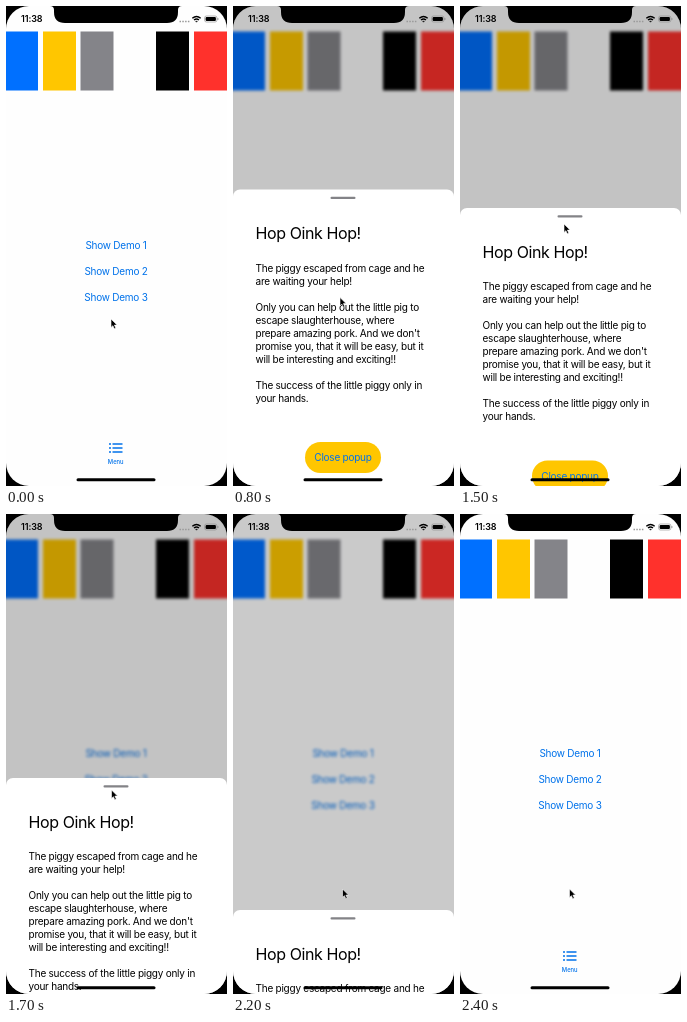
These frames come from a looping animation (221x480 px, 2.5 s). An HTML page:

```html
<!DOCTYPE html>
<html lang="en">
<head>
<meta charset="utf-8">
<title>Popup demo</title>
<style>
html, body { margin: 0; width: 100%; height: 100%; overflow: hidden; background: #000; }
svg { display: block; }
text { font: 10px Inter, Roboto, sans-serif; letter-spacing: -.24px; }
.link { fill: #0072ea; text-anchor: middle; }
.tab { font-size: 5.8px; font-weight: 500; letter-spacing: 0; }
.title { font-size: 16px; letter-spacing: -.4px; }
.clock { font-size: 9px; font-weight: 600; letter-spacing: -.1px; }
</style>
</head>
<body>
<svg width="221" height="480" viewBox="0 0 221 480">
  <clipPath id="screen"><rect width="221" height="480" rx="23"/></clipPath>
  <g clip-path="url(#screen)">
    <rect width="221" height="480" fill="#fefefe"/>
    <g id="page">
      <g id="bars"></g>
      <text class="link" x="110" y="242.5">Show Demo 1</text>
      <text class="link" x="110" y="268.7">Show Demo 2</text>
      <text class="link" x="110" y="295" id="pressed">Show Demo 3</text>
      <path d="M103 438h2m1.5 0h10M103 442h2m1.5 0h10M103 446h2m1.5 0h10" stroke="#0072ea" stroke-width="1.6"/>
      <text class="link tab" x="109.7" y="457.5">Menu</text>
    </g>
    <rect id="dim" width="221" height="480"/>

    <text class="clock" x="15" y="16.3">11:38</text>
    <path d="M173.5 15.5h10" stroke="#999" stroke-width="1.4" stroke-dasharray="1.5 1.3"/>
    <g fill="none" stroke="#000" stroke-width="1.4">
      <path d="M186.3 12.2q4.2-3.6 8.4 0M188 14q2.5-2 5 0"/>
      <path d="M189.6 15.2h1.8l-.9 1z" fill="#000" stroke-width=".5"/>
      <rect x="198.6" y="10" width="12.3" height="6" rx="1.8" stroke="#888" stroke-width=".6"/>
      <path d="M211.9 12v2" stroke="#888" stroke-width=".8"/>
    </g>
    <rect x="199.6" y="11" width="10.3" height="4" rx="1"/>

    <g id="sheet">
      <rect width="221" height="340" rx="7" fill="#fff"/>
      <rect x="97.5" y="7.3" width="25" height="2.2" rx="1.1" fill="#838387"/>
      <text class="title" x="22.5" y="49.5">Hop Oink Hop!</text>
      <g id="story"></g>
      <rect x="72" y="252.5" width="76" height="31" rx="15.5" fill="#ffc600"/>
      <text class="link" x="110" y="271.5">Close popup</text>
    </g>

    <path d="M44 0q4 0 4 4v2q0 11 11 11h102q11 0 11-11v-2q0-4 4-4z"/>
    <rect x="70.5" y="472.2" width="79" height="3" rx="1.5"/>
  </g>
  <path id="cursor" d="M0 0v8.4l1.9-1.7 1.4 3 1.5-.7-1.4-2.9h2.7z" stroke="#fff" stroke-width=".6"/>
</svg>
<script>
const $ = id => document.getElementById(id);

const bars = [[-8, 32, '#0070ff'], [37, 70, '#ffc600'], [74.5, 107.5, '#848489'],
  [150, 183, '#000'], [188, 229, '#ff312c']];
$('bars').innerHTML = bars.map(([a, b, color]) =>
  `<rect x="${a}" y="25.5" width="${b - a}" height="59" fill="${color}"/>`).join('');

const story = `The piggy escaped from cage and he
are waiting your help!

Only you can help out the little pig to
escape slaughterhouse, where
prepare amazing pork. And we don't
promise you, that it will be easy, but it
will be interesting and exciting!!

The success of the little piggy only in
your hands.`;
$('story').innerHTML = story.split('\n').map((line, i) =>
  `<text x="22.5" y="${82 + 13 * i}">${line}</text>`).join('');

// Each track is a list of [time, value] stops.
const sheetY = [[600, 481], [700, 285], [800, 183.5], [1300, 183.5], [1400, 189], [1500, 202],
  [1700, 264], [1900, 333], [2000, 354], [2100, 367], [2200, 396], [2300, 462], [2400, 482]];
const dim = [[500, 0], [600, .03], [700, .15], [800, .225], [900, .23], [2100, .23],
  [2200, .205], [2300, .08], [2400, 0]];
const cursorX = [[0, 105], [500, 107], [800, 107], [1300, 104], [1500, 104], [1900, 107], [2100, 109.5]];
const cursorY = [[0, 313], [100, 312], [450, 291.5], [800, 291.5], [1250, 202], [1350, 203],
  [1500, 218], [1700, 276], [1900, 341], [2000, 362], [2100, 375]];

function at(track, t) {
  const i = track.findIndex(stop => stop[0] > t);
  if (i < 0) return track[track.length - 1][1];
  if (i === 0) return track[0][1];
  const [[t0, v0], [t1, v1]] = [track[i - 1], track[i]];
  return v0 + (v1 - v0) * (t - t0) / (t1 - t0);
}

function draw() {
  const t = Math.floor(performance.now() % 2500 / 100) * 100;
  const shade = at(dim, t);
  const blur = Math.max(0, shade - .03) * 8;
  $('dim').setAttribute('opacity', shade);
  $('page').style.filter = blur ? `blur(${blur}px)` : 'none';
  $('pressed').setAttribute('opacity', t >= 500 && t <= 700 ? .4 : 1);
  $('sheet').setAttribute('transform', `translate(0 ${at(sheetY, t)})`);
  $('cursor').setAttribute('transform', `translate(${at(cursorX, t)} ${at(cursorY, t)})`);
  requestAnimationFrame(draw);
}
draw();
</script>
</body>
</html>
```
